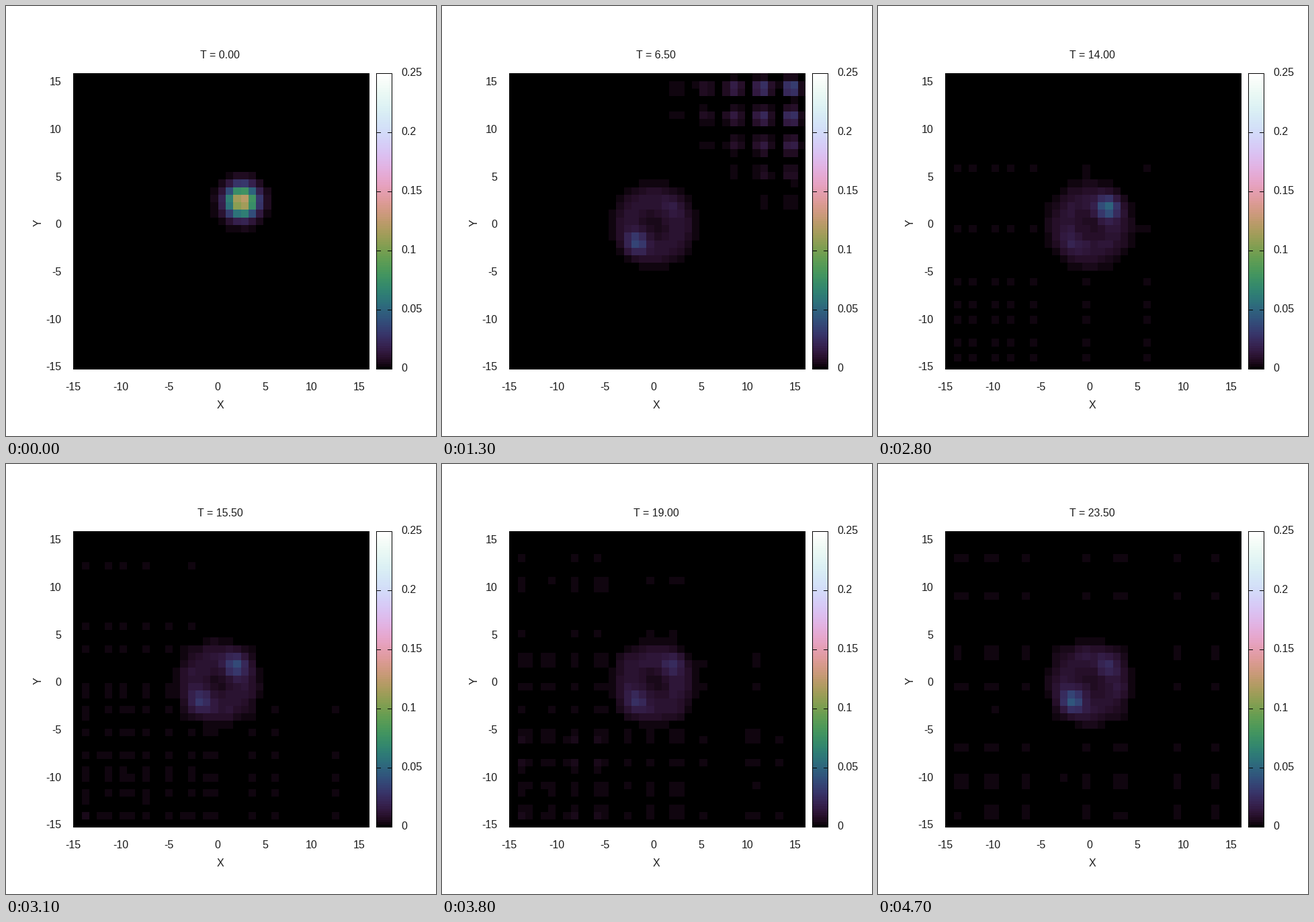
A matplotlib script for the animation above (4.8 s loop, 640 by 640 pixels).

```python
import matplotlib.pyplot as plt
import numpy as np
from matplotlib.animation import FuncAnimation
from matplotlib.patches import Rectangle

SIZE, DPI = 640, 100
N, FRAMES, DT = 39, 48, 0.5
LEVELS, VMAX = 128, 0.25

# Box with hard walls: cell width, side length, cell centres
H = 0.795
L = N * H
x = (np.arange(N) + 0.5) * H

# Free part of the packet, the same along both axes, as sine modes of the box
START, WIDTH2, K0, LEAK = 22.14 * H, 2.43, 1.1, 0.6
k = np.arange(1, N) * np.pi / L
modes = np.sqrt(2 / L) * np.sin(np.outer(k, x))
psi0 = (np.pi * WIDTH2) ** -0.25 * np.exp(-(x - START) ** 2 / (2 * WIDTH2) + 1j * K0 * x)
coef = modes @ psi0 * H

# Trapped part: brightness of its two turning points over time
Y, X = np.mgrid[0:N, 0:N] + 0.5
R = np.hypot(X - 19, Y - 20)
TIMES = [0, 2.2, 4.4, 6.5, 10, 12, 14, 17, 19, 21.3, 23.5]
UPPER = [0.052, 0.010, 0.036, 0.005, 0.034, 0.012, 0.040, 0.016, 0.012, 0.030, 0.013]
LOWER = [0, 0.044, 0.012, 0.026, 0.009, 0.028, 0.008, 0.030, 0.015, 0.012, 0.034]


def helix(v):
    """Cubehelix palette with gamma 1.5, in discrete levels."""
    g = np.clip(np.floor(np.asarray(v) / VMAX * LEVELS), 0, LEVELS - 1) / (LEVELS - 1)
    phi = 2 * np.pi * (0.5 / 3 - 1.5 * g)
    g = g ** (1 / 1.5)
    a = g * (1 - g) / 2
    c, s = np.cos(phi), np.sin(phi)
    rgb = [g + a * (p * c + q * s)
           for p, q in ((-0.14861, 1.78277), (-0.29227, -0.90649), (1.97294, 0))]
    return np.clip(np.stack(rgb, axis=-1), 0, 1)


def free(t):
    """Escaped wave, bouncing off the walls and interfering with itself."""
    p = np.abs((coef * np.exp(-1j * k ** 2 * t)) @ modes) ** 2
    return LEAK * np.outer(p[::-1], p)


def trapped(t):
    """Soft ring filling the round well, with a spot at each turning point."""
    settle = np.exp(-t)
    s2 = 2 + 1.85 * settle
    d = 2.3 + 0.84 * settle
    v = 0.008 * (1 - np.exp(-t / 1.5)) * (1 - 0.45 * np.cos(0.9 * R)) * np.exp(-(R / 5.8) ** 6)
    for side, amps in ((1, UPPER), (-1, LOWER)):
        r2 = (X - 19 - side * d) ** 2 + (Y - 20 + side * d) ** 2
        v += np.interp(t, TIMES, amps) * np.exp(-r2 / s2)
    return v


# Cell under each pixel of the 440 px map
cell = ((np.arange(440) + 0.1) * N / 440).astype(int)


def heatmap(t):
    return helix(free(t) + trapped(t))[np.ix_(cell, cell)]


plt.rcParams["font.family"] = "Liberation Sans"
fig = plt.figure(figsize=(SIZE / DPI, SIZE / DPI), dpi=DPI, facecolor="white")
ax = fig.add_axes([0, 0, 1, 1])
ax.axis("off")


def label(px, py, s, ha="center", **kw):
    return ax.text(px, py, s, ha=ha, va=kw.pop("va", "baseline"),
                   fontsize=16 * 72 / DPI, color="#1c1c1c", **kw)


def block(px, py, w, h, z=1):
    ax.add_patch(Rectangle((px, py), w, h, fc="black", lw=0, aa=False, zorder=z))


block(100, 100, 441, 441)
plot = ax.imshow(heatmap(0), extent=(101, 541, 540, 100), interpolation="nearest", zorder=2)

# Colour bar with a one pixel frame
block(551, 100, 24, 441)
ramp = (np.arange(LEVELS)[::-1, None] + 0.5) * VMAX / LEVELS
ax.imshow(helix(ramp), extent=(552, 574, 540, 101), interpolation="nearest", zorder=2)
for i in range(6):
    y = 540 - 88 * i
    label(588, y + 4.5, f"{0.05 * i:g}", ha="left")
    if 0 < i < 5:
        block(551, y, 7, 1, 3)
        block(568, y, 7, 1, 3)

# Axis labels
for i, v in enumerate(range(-15, 16, 5)):
    s = str(v)
    label(100 + 71 * i + 1.5 * (len(s) == 1), 571.5, s)
    label(82.5, 542.5 - 70.7 * i, s, ha="right")
label(318.5, 599, "X")
label(48, 322.5, "Y", va="center", rotation=90)
title = label(318.5, 77.5, "")

ax.set_xlim(0, SIZE)
ax.set_ylim(SIZE, 0)
ax.set_aspect("auto")


def draw(i):
    t = i * DT
    plot.set_data(heatmap(t))
    title.set_text(f"T = {t:.2f}")
    return plot, title


anim = FuncAnimation(fig, draw, frames=FRAMES, interval=100, repeat=True, repeat_delay=0)
plt.show()
```
